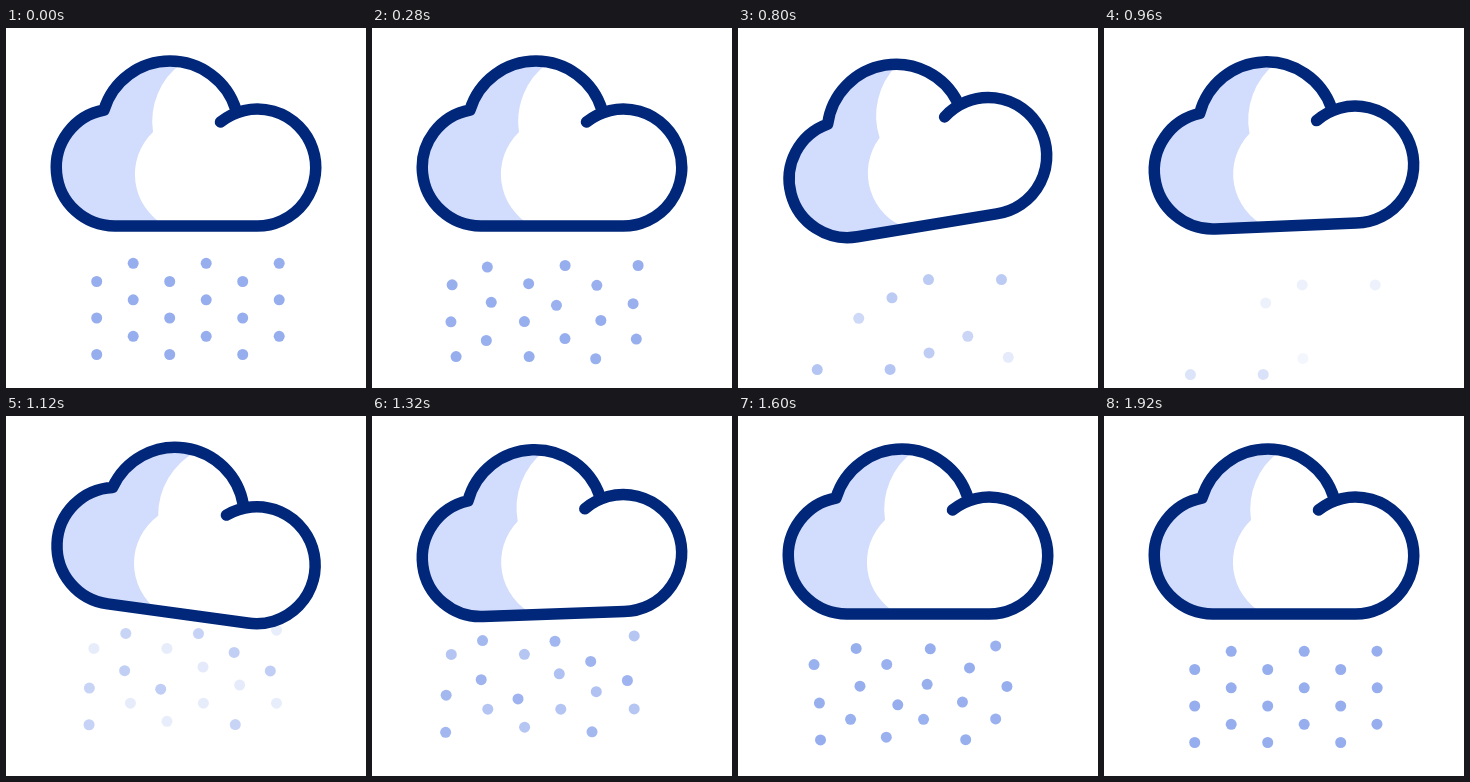
Write an HTML page that moves like this. It is 360x360 px and loops after 1.96 s.

```html
<!DOCTYPE html>
<html lang="en">
<head>
<meta charset="utf-8">
<title>Snow cloud</title>
<style>
  html, body { margin: 0; width: 100%; height: 100%; overflow: hidden; background: #fff; }
  svg { display: block; width: 100vw; height: 100vh; }
  #dots { fill: #97aeee; }
  .line { fill: none; stroke: #00277a; stroke-width: 11.5; stroke-linecap: round; stroke-linejoin: round; }
</style>
</head>
<body>
<svg viewBox="0 0 360 360">
  <g id="dots"></g>
  <g id="cloud">
    <path fill="#fff" d="M250 198H109A58.5 58.5 0 0 1 98 82A69 69 0 0 1 230 83A58.5 58.5 0 1 1 250 198Z"/>
    <path fill="#d2dcfc" d="M176 35A72 72 0 0 0 147 104A58.5 58.5 0 0 0 160 198H109A58.5 58.5 0 0 1 98 82A69 69 0 0 1 176 35Z"/>
    <path class="line" d="M214.5 94A58.5 58.5 0 1 1 250 198H109A58.5 58.5 0 0 1 98 82A69 69 0 0 1 230 82"/>
  </g>
</svg>
<script>
const LOOP = 1960, STEP = 40;
const NS = 'http://www.w3.org/2000/svg';
const cloud = document.getElementById('cloud');
const layer = document.getElementById('dots');

// Drift of a flake: out to the left, then back to the right. Entering mirrors it upwards.
const drift = document.createElementNS(NS, 'path');
drift.setAttribute('d', 'M0 0C-24 7.5 -24 6.5 0 23');
const driftLength = drift.getTotalLength();

// Cloud wobble: [time, degrees]
const wobble = [[0, 0], [560, 0], [820, -9.5], [1140, 8], [1360, -3], [1560, 0], [LOOP, 0]];

// Per row: fall-out and fall-in durations in ms; L marks a late, steady entry
const rows = [
  { out: [750, 690, 1000, 1000, 690, 1000], in: [840, 930, 850, 890, 800, 870], late: 'L.L..L' },
  { out: [695, 920, 715, 560, 930, 680], in: [940, 800, 760, 740, 770, 770], late: '...LL.' },
  { out: [1050, 650, 1055, 985, 645, 850], in: [900, 840, 865, 840, 930, 870], late: '.LLL.L' }
];

const clamp = v => Math.min(1, Math.max(0, v));
const smooth = v => v * v * (3 - 2 * v);

const flakes = rows.flatMap((row, r) => row.out.map((out, c) => {
  const late = row.late[c] === 'L';
  const el = document.createElementNS(NS, 'circle');
  el.setAttribute('r', 5.5);
  layer.append(el);
  return {
    el, out,
    x: 90.7 + 36.5 * c,
    y: (c % 2 ? 235.3 : 253.5) + 36.5 * r,
    in: row.in[c],
    start: late ? 1055 : 980,
    power: late ? 1 : 1.4
  };
}));

function angleAt(t) {
  const i = wobble.findIndex(k => k[0] > t);
  const [t0, a0] = wobble[i - 1], [t1, a1] = wobble[i];
  return a0 + (a1 - a0) * smooth((t - t0) / (t1 - t0));
}

function placeFlake(f, t) {
  const entering = t >= f.start;
  // distance from the resting place along the drift, 0 to 1
  const away = entering
    ? (1 - clamp((t - f.start) / f.in)) ** f.power
    : clamp(t / f.out) ** 1.4;
  const p = drift.getPointAtLength(away * driftLength);
  f.el.setAttribute('cx', f.x + p.x);
  f.el.setAttribute('cy', f.y + (entering ? -p.y : p.y));
  f.el.setAttribute('opacity', 1 - away ** 3.3);
}

function draw(t) {
  cloud.setAttribute('transform', `rotate(${angleAt(t)} 180 140)`);
  flakes.forEach(f => placeFlake(f, t));
}

const begin = performance.now();
function tick() {
  const t = (performance.now() - begin) % LOOP;
  draw(Math.floor(t / STEP) * STEP);
  requestAnimationFrame(tick);
}
tick();
</script>
</body>
</html>
```
